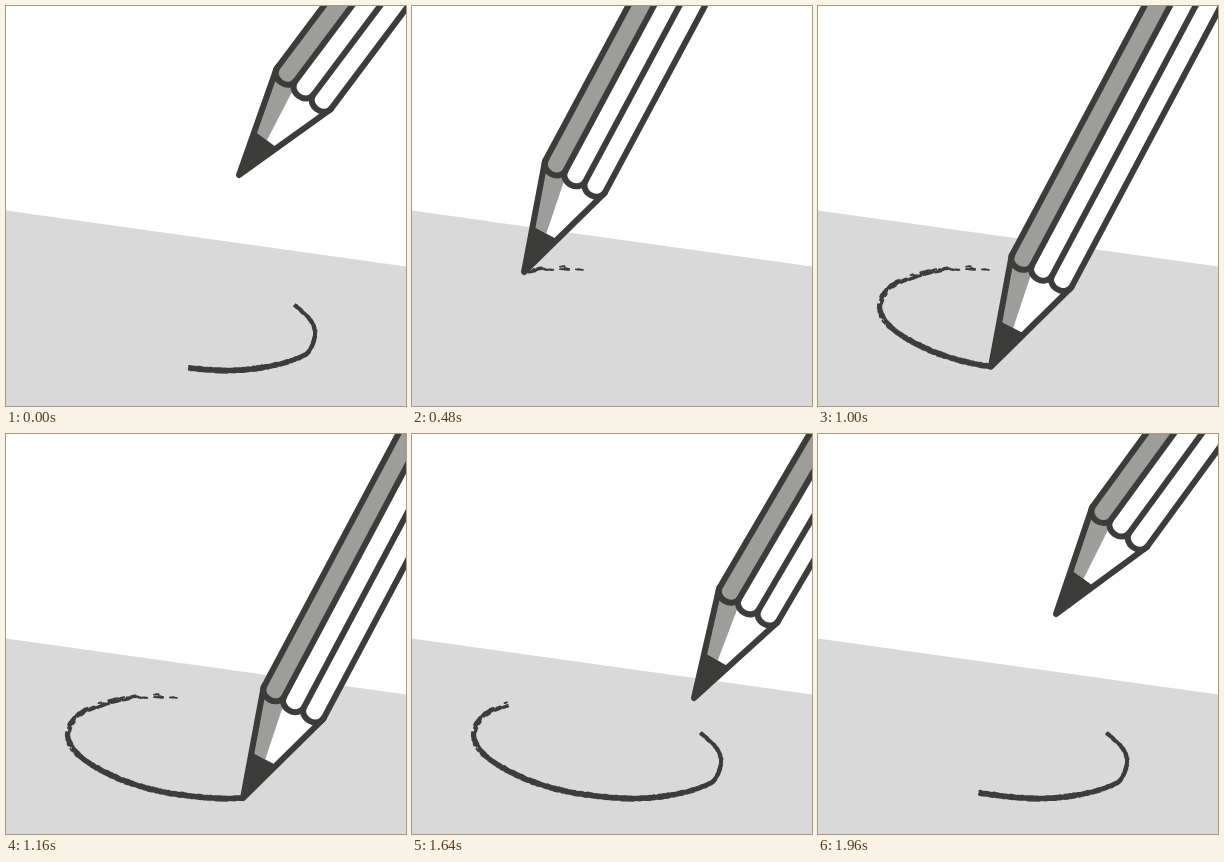
Recreate the animation shown at these times as an HTML page. Size 400 by 400 pixels, loop 2000 ms.

```html
<!DOCTYPE html>
<html lang="en">
<head>
<meta charset="utf-8">
<title>Pencil sketching a curve</title>
<style>
  html, body { margin: 0; width: 100%; height: 100%; overflow: hidden; background: #fff; }
  svg { display: block; width: 100vw; height: 100vh; }
  .ink { fill: none; stroke: #3c3c3b; stroke-linecap: round; stroke-linejoin: round; }
</style>
</head>
<body>
<svg viewBox="0 0 400 400">
  <path d="M0 204.5L400 260.5V400H0Z" fill="#d9d9d9"/>
  <path id="mark" class="ink" stroke-width="1.9"/>
  <g id="pencil">
    <path d="M0 0L-33.8 -107.5V-600H33.8V-107.5Z" fill="#fff"/>
    <path d="M-33.8 -600V-107.5L-14 -44.5H1.5L-8 -101L-11.3 -109V-600Z" fill="#9d9d9c"/>
    <path d="M0 0L-14 -44.5H14Z" fill="#3c3c3b"/>
    <g class="ink" stroke-width="6">
      <path d="M0 0L-33.8 -107.5V-600H33.8V-107.5Z"/>
      <path d="M-33.8 -108.5a11.27 9.5 0 0 0 22.53 0a11.27 9.5 0 0 0 22.54 0a11.27 9.5 0 0 0 22.53 0"/>
      <path d="M-11.27 -108.5V-600M11.27 -108.5V-600"/>
    </g>
  </g>
</svg>
<script>
const LOOP = 2000, FRAME = 40;
const DRAW_START = 330, DRAW_END = 1510, SAMPLE = 5;
const mark = document.getElementById('mark');
const pencil = document.getElementById('pencil');

// Tip positions as [time, x, y]
const land = [[0, 233, 169], [165, 209, 215], [330, 180, 264]];
const curve = [
  [330, 180, 264], [400, 148, 262], [480, 112, 266], [560, 77, 278], [640, 62, 297],
  [700, 67, 315], [760, 86, 331], [880, 127, 350], [1000, 173, 360.5], [1160, 237, 364],
  [1320, 297, 350], [1400, 309, 330], [1450, 305, 315], [1510, 289, 299]
];
const lift = [[1510, 289, 299], [1640, 282, 264], [1960, 238, 180], [2000, 233, 169]];

const clamp = (v, lo, hi) => Math.min(hi, Math.max(lo, v));

// Smooth curve through timed points
function along(keys, t) {
  const last = keys.length - 1;
  let i = 0;
  while (i < last - 1 && t > keys[i + 1][0]) i++;
  const a = keys[i], b = keys[i + 1], span = b[0] - a[0];
  const s = clamp((t - a[0]) / span, 0, 1), r = 1 - s;
  const slope = (k, c) => {
    const p = keys[Math.max(0, k - 1)], n = keys[Math.min(last, k + 1)];
    return (n[c] - p[c]) / (n[0] - p[0]) * span;
  };
  return [1, 2].map(c =>
    a[c] * (1 + 2 * s) * r * r + slope(i, c) * s * r * r +
    b[c] * s * s * (3 - 2 * s) - slope(i + 1, c) * s * s * r);
}

function seeded(seed) {
  return () => (seed = seed * 16807 % 2147483647) / 2147483647;
}

// Graphite: four parallel lanes whose gaps close as the stroke gets heavier
function buildMark() {
  const random = seeded(4711), lanes = [0, 0, 0, 0], pieces = [];
  for (let t = DRAW_START; t < DRAW_END; t += SAMPLE) {
    const [x, y] = along(curve, t), [x2, y2] = along(curve, t + SAMPLE);
    const length = Math.hypot(x2 - x, y2 - y);
    const nx = (y - y2) / length, ny = (x2 - x) / length;
    const cover = t < 480 ? 0.15 + 0.3 * (t - DRAW_START) / 150
                          : clamp(0.6 + (t - 480) / 800, 0, 1);
    const gap = 1.25 - 0.55 * clamp((t - 1200) / 200, 0, 1) - (t < 480 ? 0.35 : 0);
    let d = '';
    lanes.forEach((on, k) => {
      if (random() < 0.5) lanes[k] = on = random() < cover;
      const o = (k - 1.5) * gap + (random() - 0.5) * 0.8;
      if (on) d += `M${(x + nx * o).toFixed(1)} ${(y + ny * o).toFixed(1)}` +
                   `L${(x2 + nx * o).toFixed(1)} ${(y2 + ny * o).toFixed(1)}`;
    });
    pieces.push(d);
  }
  return pieces;
}
const pieces = buildMark();

function render(t) {
  const keys = t < DRAW_START ? land : t < DRAW_END ? curve : lift;
  const [x, y] = along(keys, t);
  const fromPeak = Math.min(t, LOOP - t);
  const angle = 28 + 8.9 * Math.max(0, 1 - fromPeak / 490);
  pencil.setAttribute('transform', `translate(${x} ${y}) rotate(${angle})`);

  // The tail is erased faster than the head is drawn
  const erasing = t < DRAW_START || t >= DRAW_END;
  const sinceEnd = (t - DRAW_END + LOOP) % LOOP;
  const head = erasing ? DRAW_END : t;
  const tail = erasing ? DRAW_START + sinceEnd * 1.42 : DRAW_START;
  const index = time => Math.round((time - DRAW_START) / SAMPLE);
  mark.setAttribute('d', pieces.slice(index(tail), index(head)).join(''));
}

const start = performance.now();
function tick() {
  const t = (performance.now() - start) % LOOP;
  render(Math.floor(t / FRAME) * FRAME);
  requestAnimationFrame(tick);
}
tick();
</script>
</body>
</html>
```
